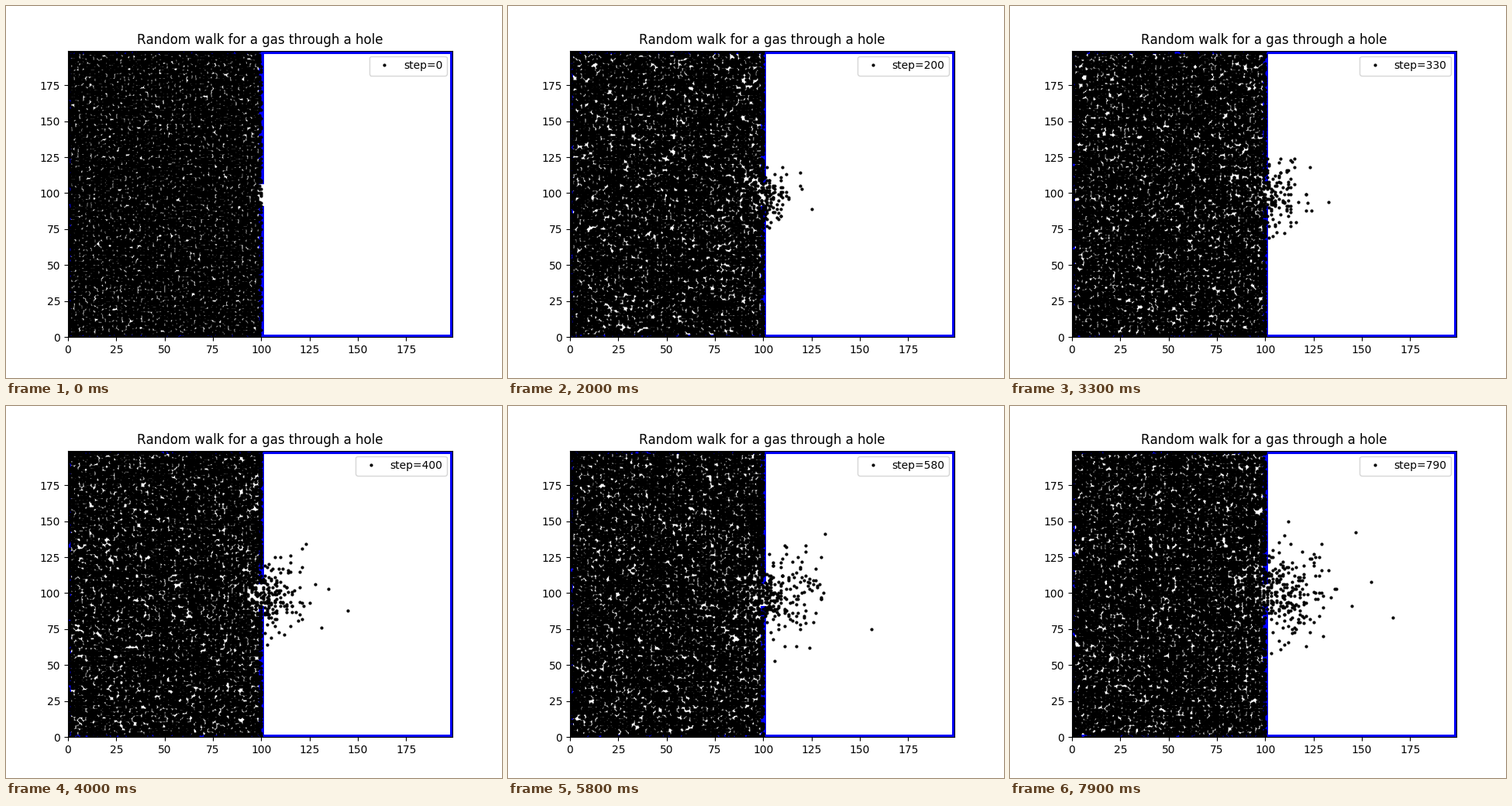
Animation, 640 px wide and 480 px high, one loop 8 s. Source, as a matplotlib script:

```python
import numpy as np
import matplotlib.pyplot as plt
from matplotlib.animation import FuncAnimation

SIZE = 199            # last lattice index
WALL = 100            # column of the dividing wall
HOLE = (89.5, 108.5)  # opening in the wall
FRAMES = 80
STEPS = 10            # walk steps per frame
MOVES = np.array([[1, 0], [-1, 0], [0, 1], [0, -1]])

plt.rcParams["text.kerning_factor"] = 6  # whole-pixel letter spacing
rng = np.random.default_rng(4)


def step(pos):
    """Move every particle to a random neighbour unless a wall blocks it."""
    new = pos + MOVES[rng.integers(0, 4, len(pos))]
    outside = ((new < 0) | (new > SIZE)).any(axis=1)
    crossing = (pos[:, 0] > WALL) != (new[:, 0] > WALL)
    in_hole = (pos[:, 1] > HOLE[0]) & (pos[:, 1] < HOLE[1])
    blocked = outside | (crossing & ~in_hole)
    return np.where(blocked[:, None], pos, new)


def simulate():
    """The left half starts with one particle on each site."""
    x, y = np.meshgrid(np.arange(WALL), np.arange(SIZE + 1))
    pos = step(np.column_stack([x.ravel(), y.ravel()]))
    states = [pos]
    for _ in range(FRAMES - 1):
        for _ in range(STEPS):
            pos = step(pos)
        states.append(pos)
    return states


states = simulate()

fig, ax = plt.subplots(figsize=(6.4, 4.8), dpi=100)
ax.set_title("Random walk for a gas through a hole")
ax.set_xlim(0, SIZE)
ax.set_ylim(0, SIZE)
ax.set_xticks(range(0, SIZE, 25))
ax.set_yticks(range(0, SIZE, 25))

ax.plot([0, SIZE, SIZE, 0, 0], [0, 0, SIZE, SIZE, 0], "b-", lw=5)
for ends in ((0, HOLE[0]), (HOLE[1], SIZE)):
    ax.plot([WALL, WALL], ends, "b-", lw=5)
gas, = ax.plot([], [], "k.", ms=4)


def draw(i):
    gas.set_data(states[i][:, 0], states[i][:, 1])
    gas.set_label(f"step={i * STEPS}")
    ax.legend(handles=[gas], loc="upper right")
    return gas,


anim = FuncAnimation(fig, draw, frames=FRAMES, interval=100,
                     repeat=True, repeat_delay=0)
plt.show()
```
